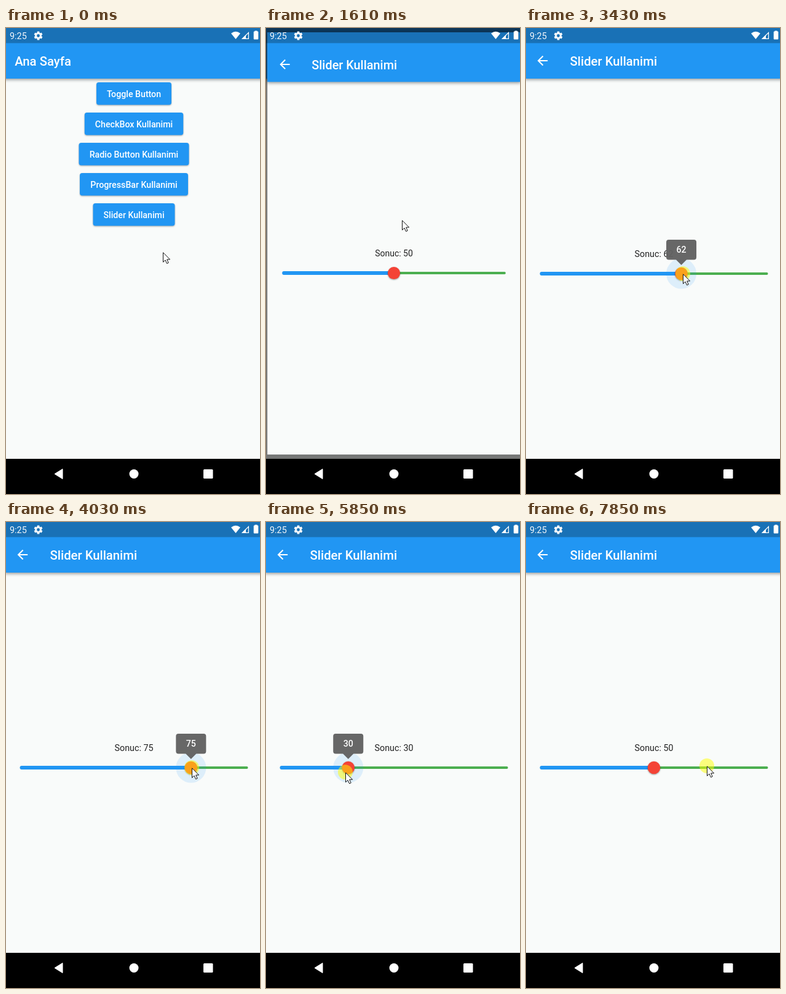
Animation of 413x755 px, one loop 8 s. Source, as an HTML page:

```html
<!DOCTYPE html>
<html lang="tr">
<head>
<meta charset="utf-8">
<title>Slider</title>
<style>
  html, body { margin: 0; width: 100%; height: 100%; overflow: hidden; background: #000; }
  svg { display: block; width: 413px; height: 755px; font-family: Roboto, sans-serif; }
  .bar { fill: #2196f3; filter: drop-shadow(0 2px 2.5px rgba(0, 0, 0, .38)); }
  .title { fill: #fff; font-size: 20.3px; font-weight: 500; }
  .button rect { fill: #2196f3; filter: drop-shadow(0 1.5px 1.2px rgba(0, 0, 0, .32)); }
  .button text, #label text { fill: #fff; font-size: 14.2px; font-weight: 500; text-anchor: middle; }
  #result { fill: #222; font-size: 14.3px; text-anchor: middle; }
  #thumb { fill: #f44336; filter: drop-shadow(0 1px 1.2px rgba(0, 0, 0, .4)); }
</style>
</head>
<body>
<svg viewBox="0 0 413 755">
  <g id="home">
    <rect x="-2" width="420" height="698" fill="#f9fbfa"/>
    <rect class="bar" x="-12" width="440" height="82"/>
    <text class="title" x="14.3" y="61">Ana Sayfa</text>
    <g id="buttons"></g>
  </g>
  <rect id="scrim" width="413" height="698" opacity=".52"/>
  <g id="page">
    <rect x="-2" width="420" height="698" fill="#f9fbfa"/>
    <rect class="bar" x="-2" width="420" height="82"/>
    <path fill="#fff" transform="translate(14.4 40.5) scale(1.04)"
      d="M20 11H7.83l5.59-5.59L12 4l-8 8 8 8 1.41-1.41L7.83 13H20z"/>
    <text class="title" x="71.5" y="61">Slider Kullanimi</text>
    <text id="result" x="208" y="370.5"></text>
    <rect x="200" y="396" width="193.5" height="4" rx="2" fill="#4caf50" id="rest"/>
    <rect x="22.5" y="395" height="6" rx="3" fill="#2196f3" id="done"/>
    <g id="knob">
      <circle id="halo" cy="398" r="24.5" fill="#2196f3" opacity=".13"/>
      <circle id="thumb" cy="398" r="10.3"/>
      <g id="label">
        <path fill="#616161" opacity=".96"
          d="M-20.5 343h41a4 4 0 0 1 4 4v24.5a4 4 0 0 1-4 4H8.5L0 384l-8.5-8.5h-12a4 4 0 0 1-4-4V347a4 4 0 0 1 4-4z"/>
        <text id="number" y="364"></text>
      </g>
    </g>
  </g>

  <rect width="413" height="24.5" opacity=".25"/>
  <g fill="#fff">
    <text x="6" y="18" font-size="14.4" opacity=".95">9:25</text>
    <g transform="translate(52.5 12.5)" opacity=".95">
      <circle r="3.9" fill="none" stroke="#fff" stroke-width="3"/>
      <g id="teeth"></g>
    </g>
    <path d="M366 8.8Q373.5 2.8 381 8.8L373.5 18z"/>
    <path d="M383 18L390 11V18z"/>
    <path d="M384.5 17.4L394.4 7.5V17.4z" fill="none" stroke="#fff" stroke-width="1.2"/>
    <path d="M404.5 5.5v-1h4v1h.8a1 1 0 0 1 1 1V17.500a1 1 0 0 1-1 1h-5.600a1 1 0 0 1-1-1V6.500a1 1 0 0 1 1-1z"/>
  </g>

  <rect y="698" width="413" height="57"/>
  <g fill="#fff">
    <path d="M79 722.5L92 714.500V730.500z" stroke="#fff" stroke-linejoin="round"/>
    <circle cx="208" cy="722.5" r="7.5"/>
    <rect x="321" y="715" width="15.500" height="15" rx="1.500"/>
  </g>

  <g id="pointer">
    <circle id="press" r="12" fill="#ff0" opacity=".5"/>
    <path d="M.5 .8V16.300L4 13 6.600 18.600 9.200 17.400 6.700 12H11.600z" fill="#fff" stroke="#111" stroke-width="1"/>
  </g>
</svg>
<script>
const $ = id => document.getElementById(id);
const DURATION = 8000, TICK = 201.5, LEAD = 10;

// tick, pointer x, pointer y, slider value
const keys = [
  [0, 255, 363, 50], [3, 221, 311, 50], [9, 221, 311, 50], [12, 217, 392, 50],
  [13, 217, 395, 50], [14, 224, 396, 53], [17, 255, 398, 62], [18, 244, 398, 59],
  [20, 302, 398, 75], [21, 302, 398, 75], [22, 296, 399, 74], [25, 225, 402, 57],
  [27, 170, 405, 42], [28, 154, 405, 37], [32, 54, 406, 8], [33, 54, 406, 8],
  [36, 208, 402, 8], [37, 208, 402, 50], [38, 230, 400, 50], [39, 294, 395, 50]
];

const within = (tick, ...spans) => spans.some(([a, b]) => tick >= a && tick <= b);
const show = (id, on) => $(id).setAttribute("display", on ? "inline" : "none");
const set = (id, name, value) => $(id).setAttribute(name, value);

$("buttons").innerHTML = [
  ["Toggle Button", 122], ["CheckBox Kullanimi", 160.5], ["Radio Button Kullanimi", 179],
  ["ProgressBar Kullanimi", 176], ["Slider Kullanimi", 133]
].map(([text, width], i) => `<g class="button" transform="translate(208 ${88 + i * 49})">
  <rect x="${-width / 2}" width="${width}" height="36.5" rx="4"/><text y="23.5">${text}</text></g>`).join("");

$("teeth").innerHTML = Array.from({ length: 6 }, (_, i) =>
  `<rect x="-1.9" y="-7" width="3.8" height="3" rx=".6" transform="rotate(${i * 60})"/>`).join("");

function sample(tick) {
  const next = keys.findIndex(key => key[0] >= tick);
  if (next < 0) return keys[keys.length - 1].slice(1);
  if (next === 0) return keys[0].slice(1);
  const a = keys[next - 1], b = keys[next];
  const k = (tick - a[0]) / (b[0] - a[0]);
  return [1, 2, 3].map(i => a[i] + (b[i] - a[i]) * k);
}

function render(time) {
  const tick = Math.floor((time % DURATION + LEAD) / TICK);
  const [x, y, raw] = sample(tick);
  const value = Math.round(raw);
  const knobX = 208 + (value - 50) * 3.713;
  const dragging = within(tick, [14, 33], [37, 37]);

  show("scrim", tick === 8);
  show("page", tick >= 8);
  set("page", "transform", tick === 8 ? "translate(208 349) scale(.98) translate(-208 -349)" : "");

  $("result").textContent = "Sonuc: " + value;
  $("number").textContent = value;
  set("done", "width", knobX - 22.5);
  set("rest", "x", knobX);
  set("rest", "width", 393.5 - knobX);
  set("knob", "transform", `translate(${knobX} 0)`);
  show("halo", dragging);
  show("label", dragging);

  set("pointer", "transform", `translate(${x} ${y})`);
  show("press", within(tick, [7, 7], [14, 32], [36, 37], [39, 39]));
}

const start = performance.now();
function loop() {
  render(performance.now() - start);
  requestAnimationFrame(loop);
}
loop();
</script>
</body>
</html>
```
